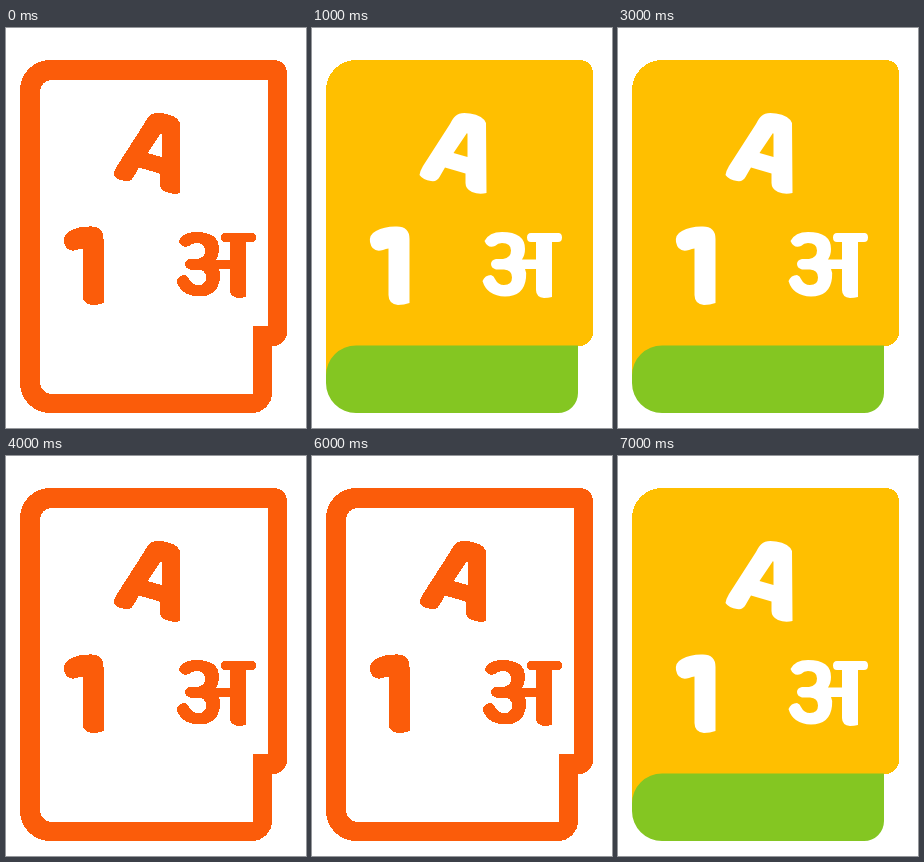
These frames come from a looping animation (300 by 400 pixels, 8 s). An HTML page:

```html
<!DOCTYPE html>
<html lang="en">
<head>
<meta charset="utf-8">
<title>Alphabet book</title>
<style>
  html, body { margin: 0; width: 100%; height: 100%; overflow: hidden; background: #fff; }
  svg { display: block; width: 100vw; height: 100vh; }
  .outline { color: #fb5c0a; animation: blink 2s step-end infinite; }
  .filled { color: #fff; animation: blink 2s step-end -1s infinite; }
  .outline, .cover { shape-rendering: crispEdges; }
  @keyframes blink { 0% { visibility: visible; } 50%, 100% { visibility: hidden; } }
</style>
</head>
<body>
<svg viewBox="0 0 300 400">
  <defs>
    <g id="letters" fill="currentColor" fill-rule="evenodd">
      <!-- A -->
      <path d="M143.500 88Q148 83.500 158 85.500Q171 87.500 174 95L174.500 165Q167 167 160 164Q153.500 161 153.500 155V145.500L133 139.500L127.500 149Q125 154 119 153Q111 152 107.500 147Q108 143 111 138L138 96Q141 90 143.500 88ZM155 105L141.500 125L155.500 129V106Z"/>
      <!-- 1 -->
      <path d="M58 214Q57 206.500 64 203Q72 198.500 83 198.500Q97.500 197.500 97.500 211V275Q92 277 86 277Q76.500 276 76.500 267V220.500Q74 220.500 71 222Q60 225 58 214Z"/>
      <!-- Devanagari a -->
      <path d="M172.500 213Q177 204 190 204Q213 204 213 221Q213 227 210 231.500H224V214H219Q215 214 215 209.500Q215 205 219 205H247Q250 205.500 250 209.500Q250 214 246 214H240V269Q236 270 232 270Q224 269 224 262V241H213Q215 245 214 250Q212 268.500 193 268.500Q175 268 170.500 253Q173 247 179 247Q182 248 183 251Q186 257 192 257Q200 257 200 249.500Q200 242 192 241.500H184Q179 240 179 236Q179 232 184 231H191Q199 230 199 222.500Q199 215 190 215Q186 215 183 218Q176 221 172.500 213Z"/>
    </g>
  </defs>

  <g class="outline">
    <path fill="currentColor" fill-rule="evenodd" d="M44 32H268A13 13 0 0 1 281 45V304A14 14 0 0 1 267 318H266V365A20 20 0 0 1 246 385H44A30 30 0 0 1 14 355V62A30 30 0 0 1 44 32ZM46 52A12 12 0 0 0 34 64V354A12 12 0 0 0 46 366H247V298H262V52Z"/>
    <use href="#letters"/>
  </g>

  <g class="filled">
    <path class="cover" fill="#ffbf00" d="M44 32H268A13 13 0 0 1 281 45V304A14 14 0 0 1 267 318H44L14 355V62A30 30 0 0 1 44 32Z"/>
    <path fill="#84c622" d="M44 317.500H266V365A20 20 0 0 1 246 385H44A30 30 0 0 1 14 355V347.500A30 30 0 0 1 44 317.500Z"/>
    <use href="#letters"/>
  </g>
</svg>
</body>
</html>
```
